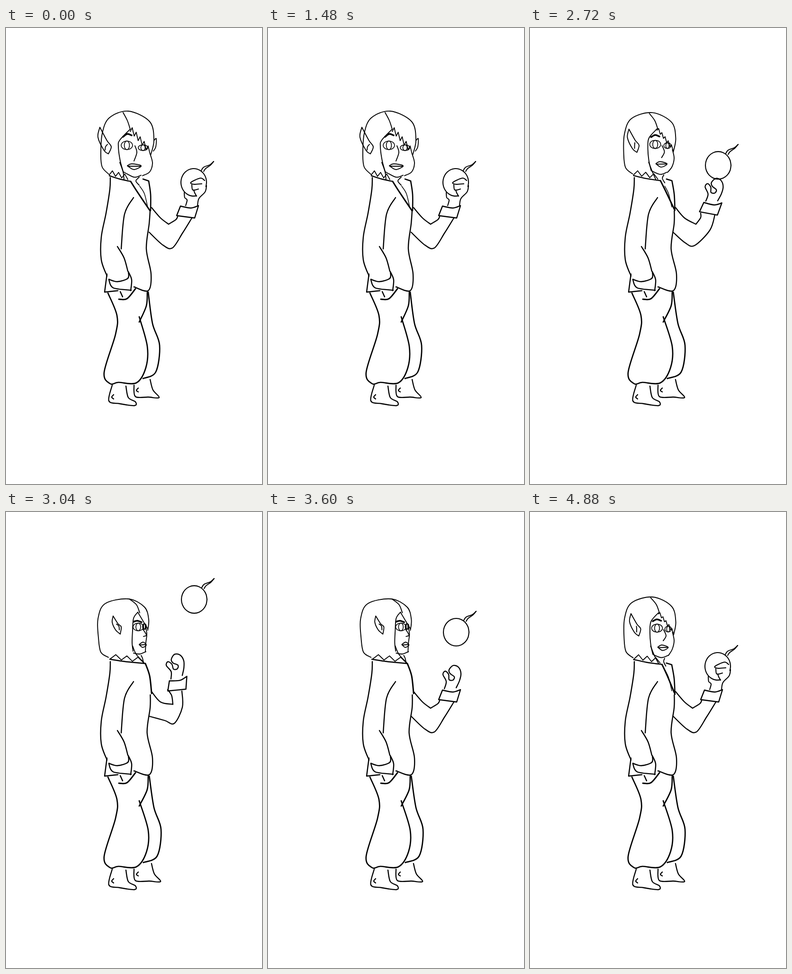
An HTML page that plays this animation: 540 by 960 pixels, repeating every 4.92 s.

```html
<!DOCTYPE html>
<html lang="en">
<head>
<meta charset="utf-8">
<title>Toss</title>
<style>
html, body { margin: 0; width: 100%; height: 100%; overflow: hidden; background: #fff; }
svg { display: block; width: 100%; height: 100%; }
path { fill: none; stroke: #000; stroke-linecap: round; stroke-linejoin: round; }
</style>
</head>
<body>
<svg id="stage" viewBox="0 0 540 960"></svg>
<script>
const LOOP = 4920;
const LAUNCH = 2652, APEX = 3200, RISE = 154;
const CATCH = 2 * APEX - LAUNCH;
const GRIP = [382, 387], PALM = [386, 375];

const clamp = x => Math.min(1, Math.max(0, x));
const ramp = (t, from, to) => clamp((t - from) / (to - from));
const smooth = x => x * x * (3 - 2 * x);
const hump = (t, from, to) => Math.sin(Math.PI * ramp(t, from, to));
const mix = (a, b, k) => a.map((v, i) => v + (b[i] - v) * k);
const add = (a, b) => [a[0] + b[0], a[1] + b[1]];

// Reads "x,y x,y"; a star marks a sharp corner by repeating the point.
function points(text) {
  const list = [];
  for (const [, x, y, corner] of text.matchAll(/(\d+),(\d+)(\*?)/g)) {
    list.push([+x, +y]);
    if (corner) list.push([+x, +y]);
  }
  return list;
}

// One stroke per line: optional width, points facing us, then points in profile.
const strokes = (width, text) => text.trim().split('\n').map(line => {
  const own = line.match(/w([\d.]+)/);
  const [a, b = a] = line.split('|').map(points);
  return { w: own ? +own[1] : width, a, b };
});

const head = strokes(1.9, `
217,308 203,293 200,268 203,222 218,189 258,175 303,197 312,236 305,268 | 224,306 208,295 203,265 202,225 217,193 266,183 300,200 309,226 307,249
247,178 256,195 262,213 | 268,183 283,195 290,212
262,213* 240,236 237,250 241,280 248,305 | 286,211* 277,224 275,250 274,275 276,293
240,283 247,303 249,320 | 275,282 283,300 299,317
198,209* 194,230 207,258 216,265* 222,250 213,237 198,209 | 234,219* 232,232 239,248 249,257* 251,242 244,235 234,219
214,245 210,250 209,257 | 241,236 246,240 247,248
w3.5 247,229 256,223 265,226 | 277,231 285,229 294,232
272,248 276,262 270,280 | 297,247 304,259 298,262
256,290 265,286 285,290 270,298 256,290 | 289,279 297,274 304,280 296,285 289,279
257,291 285,291 | 290,280 303,279
248,303 270,314 285,310 | 277,297 290,299 303,294
305,268 309,285 303,303 288,311 | 302,238 305,257 303,275 302,293
281,314 274,322 281,331 | 293,302 296,308 298,318`);
const farEar = strokes(1.8, '313,236 317,233 316,250 311,259');

const coat = strokes(2.4, `
220,315 219,340 211,390 201,440 201,488 213,522
218,311 240,318 263,323 | 219,310 252,315 294,319
w3 263,323 275,342 304,385 | 294,319 303,345 307,382
304,385 302,412 296,465 306,518 300,553 270,545
269,357 250,392 243,465
235,460 249,484 257,512
217,529 235,534 257,527 258,513* 265,530 263,553
217,530 226,547 264,552
213,518 208,556* 236,553
241,555 246,566
w3 238,571 255,570 273,549`);
const lapel = strokes(2.6, `
289,318 301,322* 305,350 305,384 | 286,318 297,321* 303,350 306,380
w1.5 282,333 292,349 299,378 | 288,333 293,349 299,375`);

const legs = strokes(2.7, `
215,558 234,605 231,645 207,725 220,749 237,746 275,747 295,715 298,670 281,608
298,556 296,585 281,619
300,556 309,622 324,668 316,724 289,738
w2.3 224,752 217,785 240,791 271,795 273,787 258,778 253,754
w2.3 270,752 273,776 300,777 323,778 310,762 304,740
w2.3 227,772 223,777 227,781
w2.3 279,758 275,763 279,766`);

const cuff = strokes(2.4, '368,375* 360,395* 398,400* 406,374* 390,379 368,375');
const grip = strokes(2.1, `
376,346 377,357 382,362 379,374
423,332 420,345 407,359 404,373
419,321 410,316 390,325 396,329 413,328
392,330 394,341 406,339
396,341 398,347 402,354`);
const openHand = strokes(2.3,
  '376,360 380,345 373,330 378,323 385,330 386,341 394,342 397,335 388,328 386,320 395,311 406,315 411,328 408,343 401,358');
const stem = strokes(2, `
412,300 417,293 430,288 438,281
417,302 421,296 431,289 438,281`);

// wrist, elbow, inside of the elbow, tilt in degrees, bulge of the sleeve
const hold = [382, 387, 351, 463, 343, 413, 0, 1];
const lift = [380, 380, 347, 458, 350, 413, 3, 11];
const fist = [361, 364, 355, 445, 352, 405, -13, 9];
const reach = [386, 375, 357, 447, 352, 411, -2, 8];

const spin = ([x, y], [px, py], deg) => {
  const r = deg * Math.PI / 180, c = Math.cos(r), s = Math.sin(r);
  return [px + (x - px) * c - (y - py) * s, py + (x - px) * s + (y - py) * c];
};
const blend = (list, k) => list.map(({ w, a, b }) => ({ w, pts: a.map((p, i) => mix(p, b[i], k)) }));
const warp = (list, move) => list.map(({ w, pts }) => ({ w, pts: pts.map(move) }));
const still = list => blend(list, 0);

function ellipse(w, [cx, cy], rx, ry, from = 0, to = 2 * Math.PI) {
  const pts = [];
  for (let i = 0; i <= 16; i++) {
    const r = from + (to - from) * i / 16;
    pts.push([cx + rx * Math.cos(r), cy + ry * Math.sin(r)]);
  }
  return { w, pts };
}

function zigzag(w, from, to, teeth, depth) {
  const pts = [];
  for (let i = 0; i <= 2 * teeth; i++) {
    const p = add(mix(from, to, i / (2 * teeth)), [0, i % 2 ? -depth : 0]);
    pts.push(p, p);
  }
  return { w, pts };
}

function drawHead(turn, lid, dx) {
  const near = mix([255, 247, 12, 9], [287, 242, 11, 8], turn);
  const far = mix([289, 252, 10, 6], [300, 241, 4, 6], turn);
  const list = [
    ...blend(head, turn),
    ...(turn < .3 ? still(farEar) : []),
    zigzag(1.8, mix([262, 218], [286, 211], turn), mix([304, 266], [307, 246], turn), 5, 13 * (1 - turn)),
    zigzag(1.8, mix([218, 309], [228, 309], turn), mix([257, 319], [298, 317], turn), 3, 10)
  ];
  for (const [x, y, rx, ry] of [near, far]) {
    list.push(ellipse(1.6, [x, y], rx, ry * lid), ellipse(1.6, [x, y], rx * .45, ry * lid));
  }
  return warp(list, p => add(p, [dx, 0]));
}

function drawBody(turn) {
  const loose = clamp(turn * 3);
  const list = [
    ...blend(coat, turn),
    ...(turn < .8 ? blend(lapel, turn) : []),
    ...still(legs)
  ];
  return warp(list, ([x, y]) => [x + 3 * loose * ramp(x, 285, 305) * ramp(y, 380, 420), y]);
}

function drawArm([wx, wy, ex, ey, ix, iy, tilt, bulge], held) {
  const wrist = [wx, wy], elbow = [ex, ey], inner = [ix, iy];
  const put = pivot => p => add(spin(p, pivot, tilt), [wx - pivot[0], wy - pivot[1]]);
  const left = add(wrist, [-20, 10]), right = add(wrist, [10, 13]);
  const top = [[307, 378], [326, 400], inner, inner, add(mix(inner, left, .6), [4, 0]), left];
  const bottom = [[302, 430], add(elbow, [-20, -6]), elbow, add(mix(elbow, right, .5), [bulge, 0]), right];
  return [
    { w: 2.3, pts: top },
    { w: 2.3, pts: bottom },
    ...warp(still(cuff), put(GRIP)),
    ...(held ? warp(still(grip), put(GRIP)) : warp(still(openHand), put(PALM)))
  ];
}

function drawBall(offset, held) {
  const rim = held ? ellipse(2.1, [396, 325], 27, 29, 1.4, 6.6) : ellipse(2.1, [396, 325], 27, 29);
  return warp([rim, ...still(stem)], p => add(p, offset));
}

function armAt(t) {
  const track = [[2480, hold], [2720, lift], [3040, fist], [3360, reach], [3600, hold]];
  let pose = hold;
  for (let i = 1; i < track.length; i++) {
    const [from] = track[i - 1], [to, next] = track[i];
    pose = mix(pose, next, smooth(ramp(t, from, to)));
  }
  const swing = 22 * hump(t, 2480, 2720);
  const dip = 13 * hump(t, 3600, 3800);
  return pose.map((v, i) => v + (i === 0 ? swing : 0) + (i % 2 && i < 6 ? dip : 0));
}

function curve(p) {
  let d = `M${p[0]}`;
  for (let i = 0; i < p.length - 1; i++) {
    const a = p[i], b = p[i + 1];
    if (a[0] === b[0] && a[1] === b[1]) continue;
    const before = p[i - 1] || a, after = p[i + 2] || b;
    const c1 = a.map((v, k) => v + (b[k] - before[k]) / 6);
    const c2 = b.map((v, k) => v - (after[k] - a[k]) / 6);
    d += `C${c1} ${c2} ${b}`;
  }
  return d;
}

const stage = document.getElementById('stage');

function draw(t) {
  const turn = smooth(ramp(t, 2480, 3040)) - ramp(t, 4720, 5040);
  const lid = 1 - .92 * hump(t, 1240, 1480);
  const settle = ramp(t, 3560, 3800);
  const lean = -8 * ramp(t, 2480, 3040) * (1 - settle) - 3 * ramp(t, 4720, 4880);
  const held = t < LAUNCH || t > CATCH;
  const arm = armAt(t);
  const flight = RISE * (((t - APEX) / (APEX - LAUNCH)) ** 2 - 1);
  const ball = held ? [arm[0] - GRIP[0], arm[1] - GRIP[1]] : [1, flight];
  const list = [
    ...drawBody(turn),
    ...drawArm(arm, held),
    ...drawBall(ball, held),
    ...drawHead(turn, lid, lean)
  ];
  stage.innerHTML = list.map(s => `<path stroke-width="${s.w}" d="${curve(s.pts)}"/>`).join('');
}

// Drawn on beats: each section starts at a time and steps by a fixed hold.
const beats = [[0, 80], [1320, 80], [2480, 80], [3600, 40], [4800, 80]];
const start = performance.now();
let shown = -1;
function tick() {
  const t = (performance.now() - start) % LOOP;
  const [from, step] = beats.filter(([at]) => at <= t).pop();
  const beat = from + Math.floor((t - from) / step) * step;
  if (beat !== shown) draw(shown = beat);
  requestAnimationFrame(tick);
}
tick();
</script>
</body>
</html>
```
